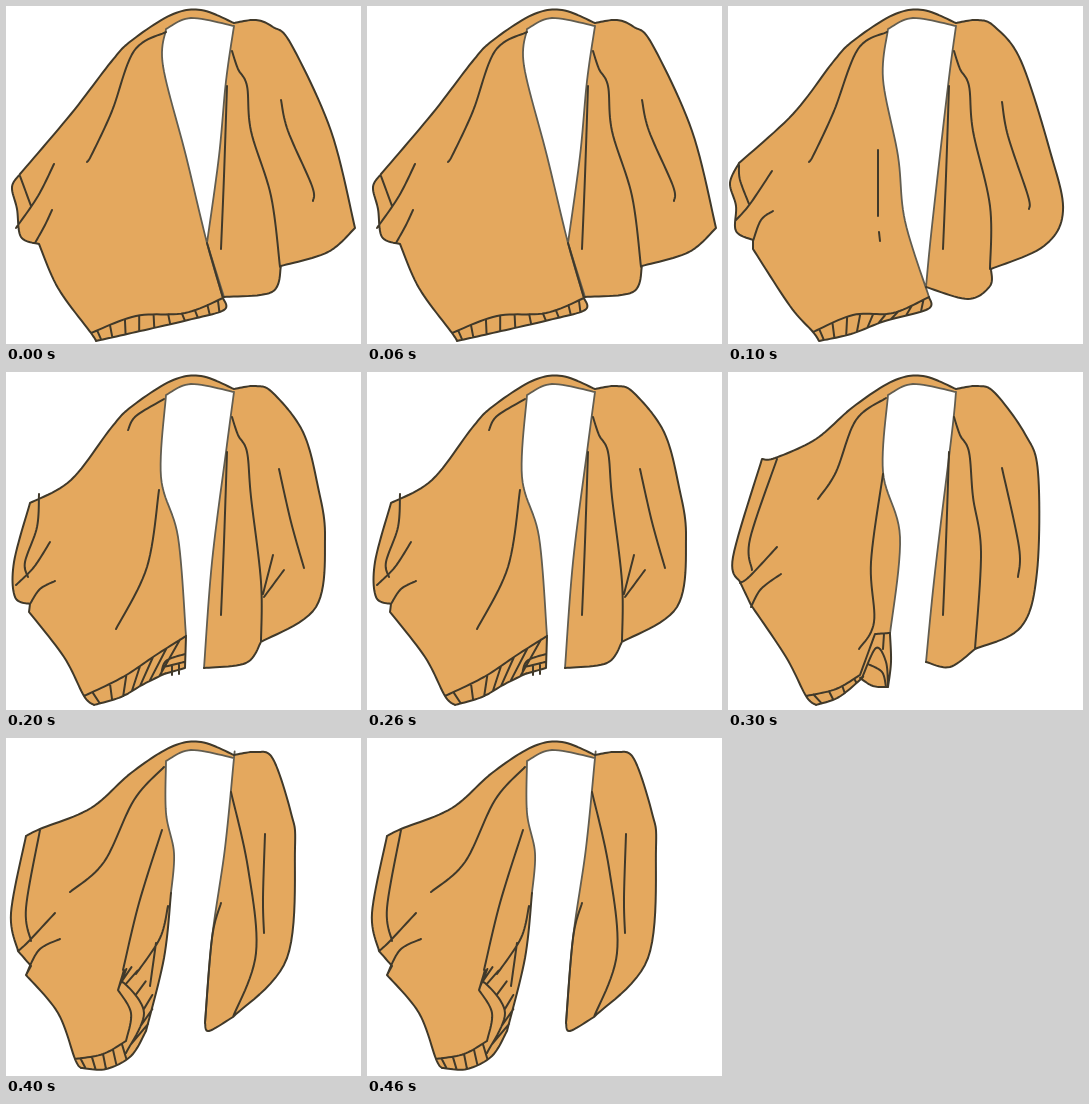
These frames come from a looping animation (355 by 338 pixels, 500 ms). An HTML page with a canvas:

```html
<!DOCTYPE html>
<html lang="en">
<head>
<meta charset="utf-8">
<title>Swaying cardigan</title>
<style>
  html, body { margin: 0; height: 100%; overflow: hidden; background: #fff; }
  canvas { display: block; }
</style>
</head>
<body>
<canvas id="stage" width="355" height="338"></canvas>
<script>
const ctx = document.getElementById('stage').getContext('2d');
const WOOL = '#e4a85e', INK = '#40392a', SOFT_INK = '#625d50';
const POSE_MS = 100;

// Parts shared by several poses. Points are "x,y"; "/" is a corner, ";" starts a new stroke.
const COLLAR = '125,35 165,9 195,4 228,17 / 250,14 267,21';
const SHOULDER = '65,108 105,56 ' + COLLAR;
const NECK = '228,20 / 185,12 160,23 /';
const PLACKET = '226,45 232,63 241,80 245,125';
const FACING = '221,80 218,170 215,243';

const parse = text => text.trim().split(/\s+/).map(p => p.split(',').map(Number));

// Point at t (0..1) on a smooth curve through pts.
function pointAt(pts, t) {
  const n = pts.length - 1, i = Math.min(Math.floor(t * n), n - 1), u = t * n - i;
  const b = pts[i], c = pts[i + 1], a = pts[i - 1] || b, d = pts[i + 2] || c;
  return [0, 1].map(k => b[k] + u / 2 * (c[k] - a[k] +
    u * (2 * a[k] - 5 * b[k] + 4 * c[k] - d[k] + u * (3 * (b[k] - c[k]) + d[k] - a[k]))));
}

function trace(path, text) {
  let last;
  for (const run of text.split('/')) {
    const pts = parse(run);
    if (last) pts.unshift(last);
    else path.moveTo(...pts[0]);
    const steps = (pts.length - 1) * 12;
    for (let i = 1; i <= steps; i++) path.lineTo(...pointAt(pts, i / steps));
    last = pts.at(-1);
  }
}

// Ribbing: the inner curve plus evenly spread rungs to the outer curve.
function addRibs(path, inner, outer, count) {
  trace(path, inner);
  const a = parse(inner), b = parse(outer);
  for (let i = 1; i <= count; i++) {
    const t = (i - 0.3) / (count + 0.4);
    path.moveTo(...pointAt(a, t));
    path.lineTo(...pointAt(b, t));
  }
}

const drawings = [];

// Outline runs from the front tip along the hem, left sleeve, collar and right side.
function addPose({ tip, hem, band, ribs, left, right, edge, folds, knot }) {
  const outer = [tip, hem, left + ' ' + right].join('/');
  const body = new Path2D(), front = new Path2D(), ink = new Path2D();
  trace(body, outer + '/' + edge);
  trace(front, edge);
  for (const stroke of [outer, ...folds.split(';')]) trace(ink, stroke);
  addRibs(ink, band, hem, ribs);
  if (knot) addRibs(ink, ...knot);
  drawings.push({ body, front, ink });
}

addPose({
  tip: '217,292',
  hem: '218,304 182,314 130,326 90,335',
  band: '217,292 179,307 130,310 85,327',
  ribs: 10,
  left: '85,327 52,282 33,238 / 15,231 11,203 6,181 14,168 / ' + SHOULDER,
  right: '285,38 325,125 349,222 / 322,246 275,260 / 266,286 218,291',
  edge: `218,291 201,237 / 213,150 220,75 ${NECK} 157,60 180,150 201,237 217,292`,
  folds: `160,26 128,45 106,105 86,148 81,156; 48,158 32,190 10,222; 46,204 39,219 29,237; 14,170 25,200;
    ${PLACKET} 265,190 274,261; ${FACING}; 275,94 282,125 306,180 307,195; 201,237 217,292`
});

addPose({
  tip: '201,291',
  hem: '200,303 157,315 123,328 91,335',
  band: '201,291 165,307 125,309 85,326',
  ribs: 9,
  left: '85,326 62,300 25,243 / 25,234 / 8,225 8,200 2,177 11,157 / ' + SHOULDER,
  right: '293,55 322,145 335,205 316,240 263,263 / 262,280 240,293 198,281',
  edge: `198,281 204,220 220,80 ${NECK} 155,73 170,150 177,215 201,291`,
  folds: `159,26 130,43 106,105 86,148 81,156; 44,165 22,198 8,214; 45,205 33,214 25,235; 11,159 12,174 21,198;
    150,144 150,210; 151,226 152,235; ${PLACKET} 262,200 262,263; ${FACING}; 274,96 280,130 300,190 301,203`
});

addPose({
  tip: '180,264 179,296 / 158,302',
  hem: '158,302 136,313 115,325 88,333',
  band: '180,264 150,283 117,305 78,324',
  ribs: 7,
  left: '78,324 58,285 23,240 / 24,232 / 9,225 8,190 24,131 / ' + SHOULDER,
  right: '297,60 312,115 319,165 310,235 255,270 / 240,291 198,296',
  edge: `198,296 206,190 220,80 ${NECK} 155,105 172,165 180,264`,
  folds: `33,122 31,155 19,190 22,205; 44,170 28,195 10,213; 49,209 34,217 24,232; 158,27 130,44 122,58;
    153,118 141,195 110,257; ${PLACKET} 255,210 255,270; ${FACING}; 273,97 285,150 298,196; 267,183 257,222;
    278,198 258,225; 155,303 160,289 179,282; 158,295 178,290; 166,294 166,303; 173,293 173,302`
});

addPose({
  tip: '162,262 163,290 160,315 / 145,314 132,306',
  hem: '134,306 111,325 88,333',
  band: '132,303 108,317 78,324',
  ribs: 4,
  left: '78,324 58,285 23,233 / 12,210 / 5,185 34,87 / 47,86 88,67 ' + COLLAR,
  right: '297,62 310,100 309,200 293,255 247,277 / 222,295 198,290',
  edge: `198,290 207,200 224,60 ${NECK} 155,100 172,165 162,262`,
  folds: `49,87 22,167 24,198; 49,175 22,204 12,211; 53,202 33,217 23,235; 158,26 128,48 108,100 90,127;
    155,102 143,190 146,250 131,277; ${PLACKET} 253,180 247,277; ${FACING}; 274,96 291,175 290,205;
    162,261 147,262 / 132,303; 134,306 148,276 158,290 160,315; 140,292 154,300 158,315; 156,262 155,277`
});

addPose({
  tip: '165,155 158,220 140,293',
  hem: '125,318 100,331 75,330',
  band: '120,303 97,316 69,321',
  ribs: 5,
  left: '69,321 52,275 20,237 / 25,228 / 12,213 / 5,175 20,98 / 34,91 85,70 ' + COLLAR,
  right: '285,75 289,110 281,220 227,279 / 203,293 199,285',
  edge: `199,285 206,200 219,110 228,20 ${NECK} 160,75 168,115 165,155`,
  folds: `34,92 20,170 25,203; 49,175 22,204 12,213; 54,201 33,212 20,237; 158,29 128,62 98,124 64,154;
    156,92 133,165 117,232; 162,168 154,200 130,236; 150,205 144,248; 225,54 242,130 250,215 227,279;
    259,96 257,160 258,195; 199,285 206,200 215,165; 120,303 125,275 112,252 / 118,232`,
  knot: ['112,252 118,245 138,275 120,315', '118,232 130,231 147,260 140,293', 7]
});

ctx.lineCap = ctx.lineJoin = 'round';

function stroke(path, color, width) {
  ctx.strokeStyle = color;
  ctx.lineWidth = width;
  ctx.stroke(path);
}

function draw() {
  const { body, front, ink } = drawings[Math.floor(performance.now() / POSE_MS) % drawings.length];
  ctx.fillStyle = '#fff';
  ctx.fillRect(0, 0, 355, 338);
  ctx.fillStyle = WOOL;
  ctx.fill(body);
  stroke(front, SOFT_INK, 1.8);
  stroke(ink, INK, 2);
  requestAnimationFrame(draw);
}
draw();
</script>
</body>
</html>
```
